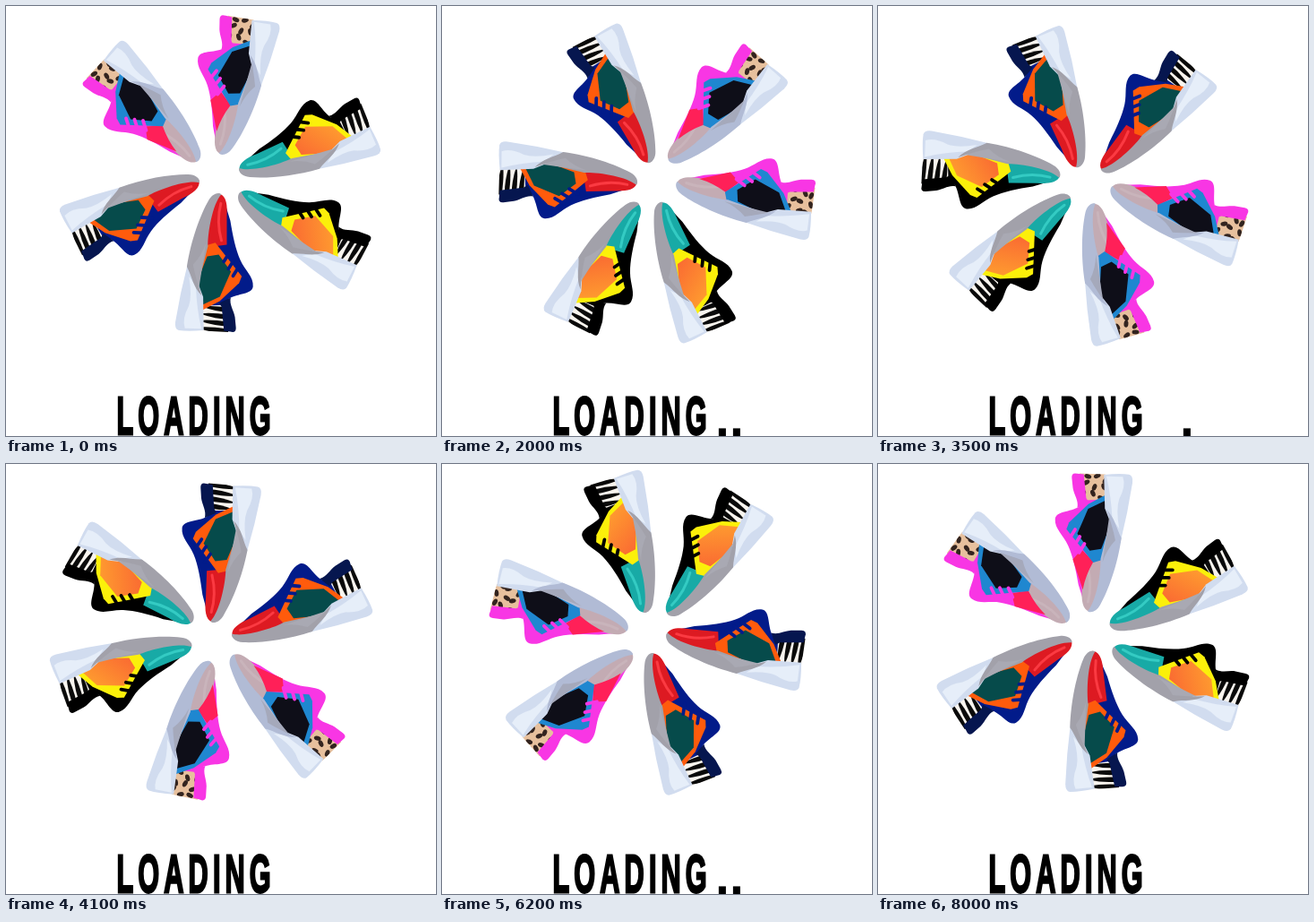
Recreate the animation shown at these times as an HTML page. Size 480 px wide and 480 px high, loop 8100 ms.

```html
<!DOCTYPE html>
<html lang="en">
<head>
<meta charset="utf-8">
<title>Loading</title>
<style>
  html, body { margin: 0; width: 100%; height: 100%; overflow: hidden; background: #fff; }
  svg { display: block; width: 100%; height: 100%; }
  text { font-family: "Liberation Sans", Arial, sans-serif; font-weight: bold; }
</style>
</head>
<body>
<svg id="stage" viewBox="0 0 480 480">
  <defs>
    <linearGradient id="sunset" x1="0" y1="0.8" x2="1" y2="0.2">
      <stop offset="0" stop-color="#fa6a32"/>
      <stop offset="1" stop-color="#ffa22f"/>
    </linearGradient>
    <clipPath id="heel"><path d="M381 152L409 140L415 169L388 176Z"/></clipPath>
  </defs>
  <g id="wheel"></g>
  <text transform="translate(123.4 478) scale(.52 1)" font-size="59" letter-spacing="9.9" stroke="#000" stroke-width="2.8">LOADING</text>
  <g id="dots" font-size="57" text-anchor="middle">
    <text x="313" y="479.5">.</text>
    <text x="329" y="479.5">.</text>
    <text x="345" y="479.5">.</text>
  </g>
</svg>
<script>
const FRAME = 100, FRAMES = 81;
const CX = 234, CY = 193;
const GREY = '#a2a1aa';

const pink = {
  upper: '#f836e4', loop: '#f836e4', vamp: '#ff2058', toe: '#c3abb3', shine: '#c9b4bb',
  frame: '#1f87d0', panel: '#0e0e18', sole: '#b1bbd5', facet: '#a5a9bb', print: 'leopard'
};
const yellow = {
  upper: '#000', loop: '#000', vamp: 'none', toe: '#18aaa6', shine: '#34cbc3',
  frame: '#fbf00a', panel: 'url(#sunset)', sole: GREY, facet: '#a9a9b3', print: 'zebra'
};
const navy = {
  upper: '#021b8a', loop: '#06164f', vamp: 'none', toe: '#dd1a22', shine: '#fb3a42',
  frame: '#ff5b0c', panel: '#064b4b', sole: GREY, facet: '#a9a9b3', print: 'zebra'
};

// tilt in degrees, then shift along and across the sole
const shoes = [
  { look: pink, tilt: -68.9, dx: 0, dy: 0 },
  { look: pink, tilt: 234.7, dx: 0, dy: 0 },
  { look: yellow, tilt: -10.5, dx: 0, dy: 0 },
  { look: yellow, tilt: 39.5, dx: 3, dy: 0 },
  { look: navy, tilt: 104.5, dx: -13, dy: -3.5 },
  { look: navy, tilt: 165.5, dx: -9.5, dy: 7.5 }
];

const fill = (color, d) => `<path fill="${color}" d="${d}"/>`;
const line = (color, width, d) =>
  `<path fill="none" stroke="${color}" stroke-width="${width}" stroke-linecap="round" d="${d}"/>`;
const paper = color => `<rect x="378" y="134" width="40" height="44" fill="${color}"/>`;

function zebra() {
  let out = paper('#f8f4ee');
  for (let i = 0; i < 4; i++) {
    const x = 386 + i * 8;
    out += fill('#0a0a0a', `M${x - 1} 136Q${x + 5} 154 ${x + 3} 176Q${x - 2} 164 ${x - 4} 142Z`);
  }
  return out;
}

function leopard() {
  let out = paper('#e7c09d');
  for (let i = 0; i < 9; i++) {
    const x = 388 + (i % 3) * 10 + (i % 2) * 3;
    const y = 150 + Math.floor(i / 3) * 10;
    out += `<ellipse cx="${x}" cy="${y}" rx="4" ry="2.5" fill="#33241f" transform="rotate(${i * 47} ${x} ${y})"/>`;
  }
  return out;
}

const prints = { zebra: zebra(), leopard: leopard() };

function draw(c) {
  const laces = [0, 1, 2].map(i =>
    line(c.upper, 3.8, `M${323 + i * 6.5} ${161 - i * 7}l11 3.5`)).join('');
  return [
    fill(c.upper, 'M270 180L288 169C304 162 318 155 328 147C338 139 342 128 353 126C362 125 364 140 373 149L386 153L398 178L372 188L300 189Z'),
    `<g clip-path="url(#heel)">${prints[c.print]}</g>`,
    fill(c.loop, 'M371 147C379 147 384 140 391 137L402 133Q408 131 408 138L409 145L384 154L380 158Z'),
    fill(c.toe, 'M262 188C262 180 273 176 284 174L315 166L323 186C305 193 280 194 262 189Z'),
    line(c.shine, 3, 'M272 184Q293 184 312 173'),
    fill(c.vamp, 'M284 175L314 156L327 163L317 179Q300 174 284 175Z'),
    fill(c.frame, 'M345 141L353 142L378 158L397 179L372 188L322 189L316 179Z'),
    fill(c.panel, 'M328 172L343 154L373 159L387 176L366 188L333 184Z'),
    laces,
    fill('#d1dcef', 'M346 203L358 191L378 177L414 167Q420 184 421 194Q421 199 413 200Q380 203 346 203Z'),
    fill('#e6eef9', 'M368 188Q392 181 413 170L417 188Q408 194 392 190Q380 189 360 198Z'),
    fill(c.sole, 'M262 186C275 193 308 190 322 186L366 186L377 179C370 191 360 194 350 203C320 206 290 203 272 198C264 196 260 190 262 186Z'),
    fill(c.facet, 'M319 189L370 184L354 193L346 197Q334 190 319 189Z')
  ].join('');
}

const wheel = document.getElementById('wheel');
for (const shoe of shoes) {
  shoe.node = document.createElementNS('http://www.w3.org/2000/svg', 'g');
  shoe.node.innerHTML = draw(shoe.look);
  wheel.appendChild(shoe.node);
}
const dots = [...document.getElementById('dots').children];

// steady turn that slows a little near the end of the loop
const turn = n => n <= 62 ? n * 4.44 : 275.3 + (n - 62) * 4.31;

function render(time) {
  const n = Math.floor(time / FRAME) % FRAMES;
  for (const { node, tilt, dx, dy } of shoes) {
    node.setAttribute('transform',
      `translate(${CX} ${CY}) rotate(${tilt + turn(n)}) translate(${dx - CX} ${dy - CY})`);
  }
  const phase = (n * FRAME) % 4050;
  dots.forEach((dot, i) => {
    const since = phase - 800 - i * 700;
    dot.setAttribute('visibility', since >= 0 && since < 1700 ? 'visible' : 'hidden');
  });
}

function tick() {
  render(performance.now());
  requestAnimationFrame(tick);
}
tick();
</script>
</body>
</html>
```
